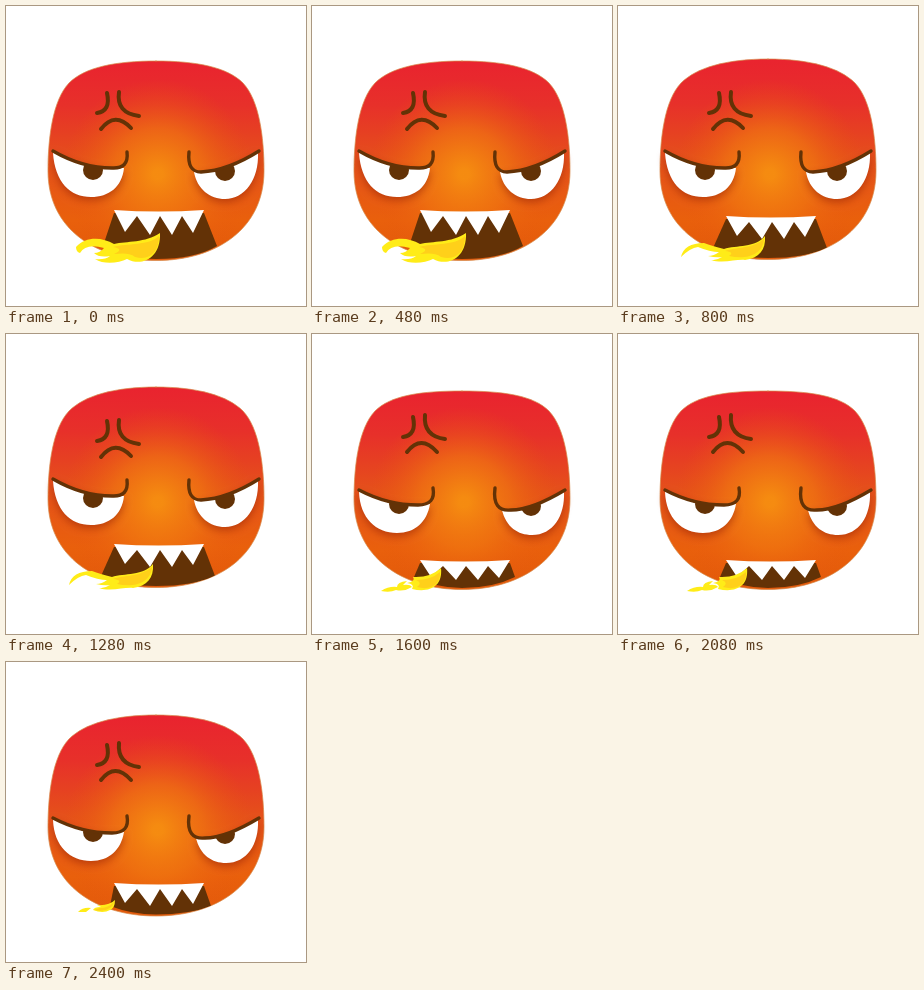
An HTML page with a canvas that plays this animation: 300 by 300 pixels, repeating every 3200 ms.

```html
<!DOCTYPE html>
<html lang="en">
<head>
<meta charset="utf-8">
<title>Angry fire face</title>
<style>
html, body { margin: 0; width: 100%; height: 100%; overflow: hidden; background: #fff; }
canvas { display: block; width: 300px; height: 300px; }
</style>
</head>
<body>
<canvas id="stage" width="300" height="300"></canvas>
<script>
const ctx = document.getElementById('stage').getContext('2d');
const BROWN = '#633206', HOLD = 800;

// each eye: lid from the outer corner inwards, hook of the brow, lower edge, pupil centre
const glaring = {
  mark: 'M91 107 Q105 105 101 87 M113 86 Q110 107 133 110 M95 123 Q109 105 125 122',
  eyes: [
    { lid: 'M47 145 C66 156 88 162 106 162', hook: 'Q123 163 121 146',
      lower: 'L118 162 C116 181 103 191 85 191 C64 191 49 176 47 147', pupil: [87, 164] },
    { lid: 'M253 145 C234 157 214 165 195 166', hook: 'Q181 166 183 146',
      lower: 'L188 166 C191 183 204 193 219 193 C239 193 253 173 252 147', pupil: [219, 165] }
  ]
};
const squinting = {
  mark: 'M91 103 Q105 101 101 83 M113 81 Q111 102 133 105 M95 118 Q109 100 125 118',
  eyes: [
    { lid: 'M47 156 C66 166 88 171 106 171', hook: 'Q124 171 121 154',
      lower: 'L118 170 C115 188 103 199 85 199 C64 199 48 184 47 158', pupil: [87, 170] },
    { lid: 'M253 156 C238 165 217 176 199 176', hook: 'Q180 178 183 154',
      lower: 'L190 176 C194 193 206 201 220 201 C241 201 253 182 252 158', pupil: [219, 172] }
  ]
};

// teeth: top edge, tip line; jaw: left and right corner, height
const poses = [
  { ...glaring, top: 55, bottom: 254.5, teeth: [204, 229], jaw: [97, 211, 240],
    flame: 'M154 227 C139 237 121 235 108 238 C96 231 80 230 70 241 Q70 246 74 247 Q80 237 98 242 Q94 247 88 247 Q93 252 104 250 Q99 254 89 253 C98 259 113 257 121 253 C136 261 155 252 154 227Z',
    core: 'M153 230 C142 240 122 237 107 241 Q119 243 108 248 Q124 246 129 251 C145 255 153 245 153 230Z' },
  { ...glaring, top: 53, bottom: 253.5, teeth: [210, 233], jaw: [95, 209, 242],
    flame: 'M147 230 C138 242 118 239 106 243 Q94 240 86 237 Q66 237 63 251 Q72 242 80 241 Q92 246 101 246 Q96 250 90 250 Q98 252 104 251 Q98 255 92 254 C106 258 118 253 127 254 C141 252 148 244 147 230Z',
    core: 'M146 233 C134 243 118 241 107 245 Q117 246 111 250 C128 254 145 249 146 233Z' },
  { ...squinting, top: 57, bottom: 255.5, teeth: [226, 246], jaw: [102, 203, 243],
    flame: 'M129 234 Q118 244 101 243 Q104 247 95 249 Q103 250 100 255 C117 259 131 253 129 234Z M69 257 Q77 252 85 253 Q85 248 95 247 L91 251 Q98 250 100 253 Q92 258 84 256 Q78 259 69 257Z',
    core: 'M128 238 Q119 246 104 246 Q111 249 105 253 C119 257 129 250 128 238Z' },
  { ...squinting, top: 53, bottom: 254, teeth: [221, 244], jaw: [104, 205, 244],
    flame: 'M109 238 Q103 244 91 243 L95 245 Q88 245 87 248 Q97 252 104 248 Q109 246 109 238Z M72 250 Q77 245 85 246 L80 250Z',
    core: 'M108 240 Q102 246 94 246 L88 248 Q105 251 108 240Z' }
];

function fill(path, color) {
  ctx.fillStyle = color;
  ctx.fill(new Path2D(path));
}

function stroke(path, width) {
  ctx.strokeStyle = BROWN;
  ctx.lineWidth = width;
  ctx.lineCap = 'round';
  ctx.stroke(new Path2D(path));
}

function drawHead({ top, bottom }) {
  const head = new Path2D(`M150 ${top} C190 ${top} 221 61 237 77 C253 94 258 130 258 165
    C258 223 210 ${bottom} 150 ${bottom} C90 ${bottom} 42 223 42 165
    C42 130 47 94 63 77 C79 61 110 ${top} 150 ${top}Z`);
  const base = ctx.createLinearGradient(0, top, 0, bottom);
  [[0, '#e9232f'], [.22, '#e7302a'], [.5, '#e5501a'], [.8, '#e9600c'], [1, '#e2590a']]
    .forEach(stop => base.addColorStop(...stop));
  const glow = ctx.createRadialGradient(152, 168, 5, 152, 168, 95);
  glow.addColorStop(0, 'rgba(246,142,16,.95)');
  glow.addColorStop(.45, 'rgba(241,120,16,.65)');
  glow.addColorStop(1, 'rgba(232,84,16,0)');
  for (const paint of [base, glow]) {
    ctx.fillStyle = paint;
    ctx.fill(head);
  }
  ctx.strokeStyle = 'rgba(214,138,74,.7)';
  ctx.lineWidth = 1;
  ctx.stroke(head);
  return head;
}

function drawEye({ lid, hook, lower, pupil }) {
  const white = lid + lower + 'Z';
  ctx.save();
  ctx.shadowColor = 'rgba(150,35,5,.6)';
  ctx.shadowBlur = 8;
  ctx.shadowOffsetY = 3;
  fill(white, '#fff');
  ctx.restore();
  ctx.save();
  ctx.clip(new Path2D(white));
  ctx.fillStyle = BROWN;
  ctx.beginPath();
  ctx.arc(...pupil, 10, 0, 7);
  ctx.fill();
  ctx.restore();
  stroke(lid + hook, 3.4);
}

function drawMouth({ bottom, teeth: [y, tip], jaw: [left, right, jawY] }, head) {
  const floor = bottom - 1.5, gap = y + 6;
  ctx.save();
  ctx.clip(head);
  fill(`M108 ${y + 3} H198 L${right} ${jawY} Q${right - 22} ${floor} 150 ${floor}
    Q${left + 22} ${floor} ${left} ${jawY}Z`, BROWN);
  ctx.restore();
  fill(`M108 ${y} Q152 ${y + 3} 198 ${y} L187 ${tip - 2} L176 ${gap} L166 ${tip} L154 ${gap}
    L144 ${tip} L131 ${gap} L119 ${tip - 3}Z`, '#fff');
}

function draw(pose) {
  ctx.clearRect(0, 0, 300, 300);
  const head = drawHead(pose);
  stroke(pose.mark, 4);
  pose.eyes.forEach(drawEye);
  drawMouth(pose, head);
  fill(pose.flame, '#ffec18');
  fill(pose.core, '#ffd01a');
}

function tick() {
  draw(poses[Math.floor(performance.now() / HOLD) % poses.length]);
  requestAnimationFrame(tick);
}
tick();
</script>
</body>
</html>
```
